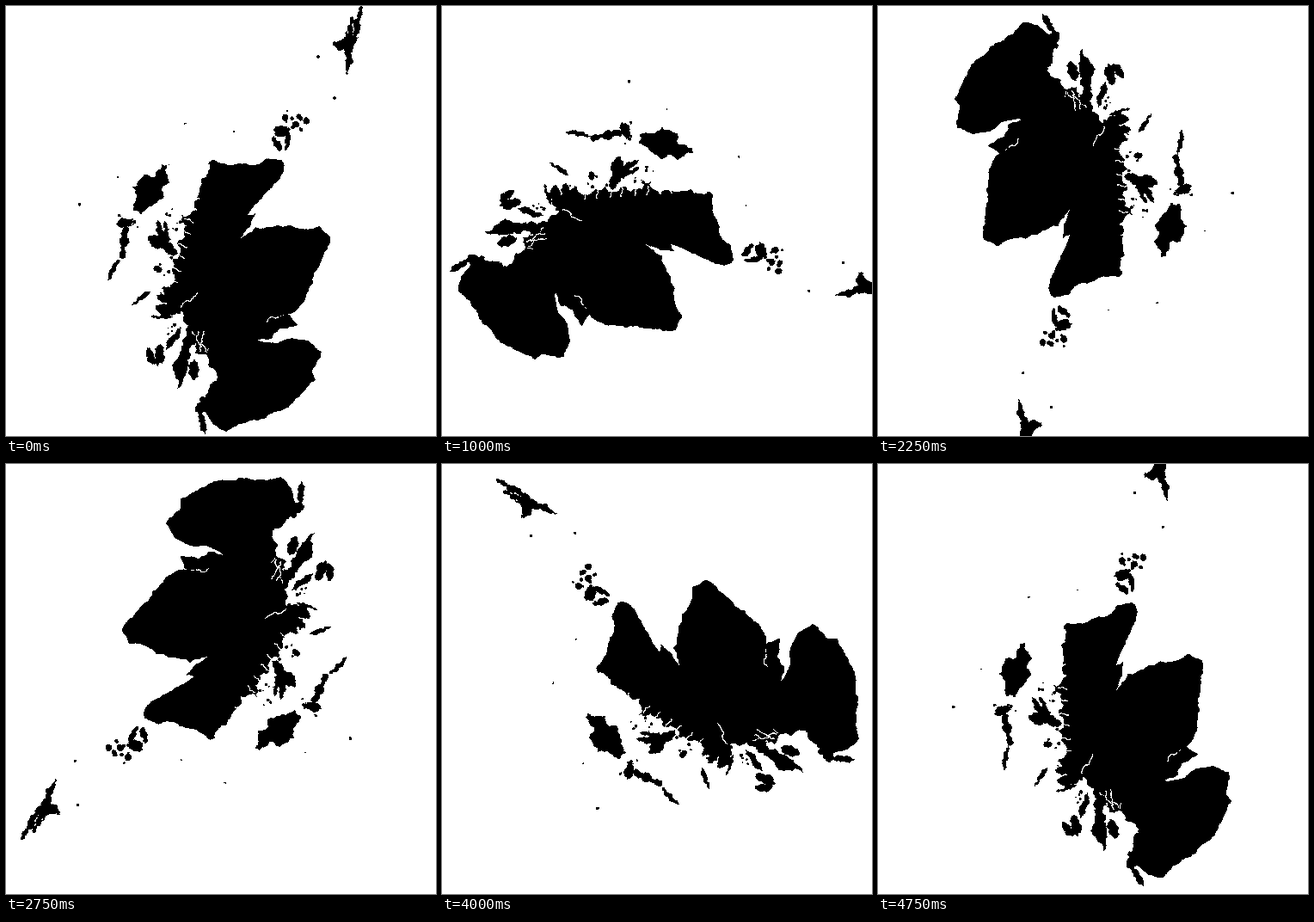
Write an HTML page that moves like this. It is 500 px wide and 500 px high and loops after 5 s.

```html
<!DOCTYPE html>
<html lang="en">
<head>
<meta charset="utf-8">
<style>
  html, body { margin: 0; height: 100%; overflow: hidden; background: #fff; }
  svg { display: block; width: 100vw; height: 100vh; }
</style>
</head>
<body>
<svg viewBox="0 0 500 500" shape-rendering="crispEdges"><g id="map"></g></svg>
<script>
const map = document.getElementById('map');
const STEP_MS = 250, STEPS = 20;
const SMOOTH = 0.25, RUGGED = 0.5;

let seed = 11;
const random = () => (seed = seed * 16807 % 2147483647) / 2147483647;
const jitter = size => (random() - 0.5) * size;
const parse = text => text.trim().split(/\s+/).map(pair => pair.split(',').map(Number));

function add(tag, attributes) {
  const node = document.createElementNS('http://www.w3.org/2000/svg', tag);
  for (const key in attributes) node.setAttribute(key, attributes[key]);
  map.append(node);
}

// Fractal coast: each edge is halved repeatedly and its middle displaced.
function fractal(a, b, roughness) {
  const length = Math.hypot(b[0] - a[0], b[1] - a[1]);
  if (length < 2.5) return [a];
  const middle = a.map((value, i) => (value + b[i]) / 2 + jitter(length * roughness));
  return [...fractal(a, middle, roughness), ...fractal(middle, b, roughness)];
}

const coast = (points, roughness) =>
  points.slice(1).flatMap((point, i) => fractal(points[i], point, roughness));
const land = points => add('polygon', { points: points.join(' ') });

// A ragged ellipse whose long axis runs between two points.
function island(x1, y1, x2, y2, width) {
  const length = Math.hypot(x2 - x1, y2 - y1);
  const ux = (x2 - x1) / length, uy = (y2 - y1) / length;
  const ring = Array.from({ length: 9 }, (_, i) => {
    const angle = i % 8 * Math.PI / 4;
    const along = Math.cos(angle) * length / 2, across = Math.sin(angle) * width / 2;
    return [(x1 + x2) / 2 + ux * along - uy * across, (y1 + y2) / 2 + uy * along + ux * across];
  });
  land(coast(ring, RUGGED));
}

const islet = (x, y, radius) => island(x - radius, y, x + radius, y, radius * 2);

function scatter(count, x, y, spreadX, spreadY, radius) {
  for (let i = 0; i < count; i++)
    islet(x + jitter(spreadX), y + jitter(spreadY), radius * (0.5 + random()));
}

const loch = (x1, y1, x2, y2) => add('polyline', {
  points: coast([[x1, y1], [x2, y2], [x2, y2]], RUGGED).join(' '),
  fill: 'none', stroke: '#fff', 'stroke-width': 1.2
});

// Mainland: smooth eastern shore, rugged western shore
const east = parse(`240,179 258,185 283,185 321,179 322,195 303,217 288,233 281,243
  290,241 270,271 290,257 316,255 364,256 377,268 370,286 357,323 345,346 318,361
  330,359 339,371 318,375 309,387 292,388 316,392 332,386 354,391 367,402 356,425
  360,435 340,455 328,467 300,480 270,486 256,495 244,488 231,472`);
const west = parse(`231,472 222,472 235,450 246,433 238,421 236,396 233,406 220,404
  221,388 206,366 205,355 181,329 194,323 193,306 203,286 199,276 207,262
  204,243 220,238 222,222 226,209 235,193 240,179`);
land([...coast(east, SMOOTH), ...coast(west, RUGGED)]);

loch(202, 355, 223, 333);
loch(317, 362, 303, 368);
for (let i = 0; i < 3; i++) loch(220 + i * 6, 402, 216 + i * 7, 378);
for (let y = 220; y < 325; y += 14) {
  const x = 222 - (y - 220) * 0.25;
  loch(x - 8, y, x + 3, y + 4);
}

// South-west: peninsulas and inner isles
island(224, 467, 232, 498, 8);
island(217, 370, 199, 445, 13);
island(218, 411, 220, 435, 12);
island(203, 373, 186, 400, 7);
island(180, 393, 177, 419, 12);
island(164, 397, 173, 417, 8);
island(174, 352, 206, 352, 14);
island(175, 336, 191, 347, 8);
island(168, 361, 194, 361, 5);
island(146, 348, 169, 331, 5);
island(171, 305, 182, 307, 8);

// Skye
island(165, 268, 195, 283, 16);
island(176, 248, 181, 276, 8);
island(185, 250, 187, 282, 7);
island(184, 282, 200, 288, 8);

// Outer Hebrides
const lewis = parse('190,184 190,206 182,224 172,230 157,242 148,238 147,210 155,203 172,199 190,184');
land(coast(lewis, RUGGED));
island(128, 253, 148, 252, 11);
island(140, 254, 135, 297, 11);
island(133, 292, 119, 320, 6);

// Orkney
island(310, 144, 330, 147, 13);
island(310, 152, 320, 168, 9);
island(329, 146, 325, 168, 6);

// Shetland
island(397, 81, 397, 28, 7);
island(382, 47, 410, 36, 12);
island(379, 42, 394, 50, 8);
island(397, 40, 403, 12, 7);
island(405, 36, 410, 12, 8);
island(410, 16, 413, 0, 6);

// Small islands
scatter(14, 337, 132, 26, 26, 2.8);
scatter(14, 192, 325, 32, 100, 1.5);
scatter(10, 142, 248, 24, 20, 1.5);
scatter(8, 195, 248, 18, 24, 1.5);
scatter(6, 180, 380, 30, 40, 1.2);
scatter(2, 86, 231, 7, 4, 1.4);
scatter(2, 202, 137, 16, 2, 1);
islet(363, 59, 1.8);
islet(382, 107, 1.8);
islet(130, 199, 1);
islet(265, 146, 1);

function draw() {
  const step = Math.floor(performance.now() / STEP_MS) % STEPS;
  map.setAttribute('transform', `rotate(${step * 360 / STEPS} 250 250)`);
  requestAnimationFrame(draw);
}
draw();
</script>
</body>
</html>
```
